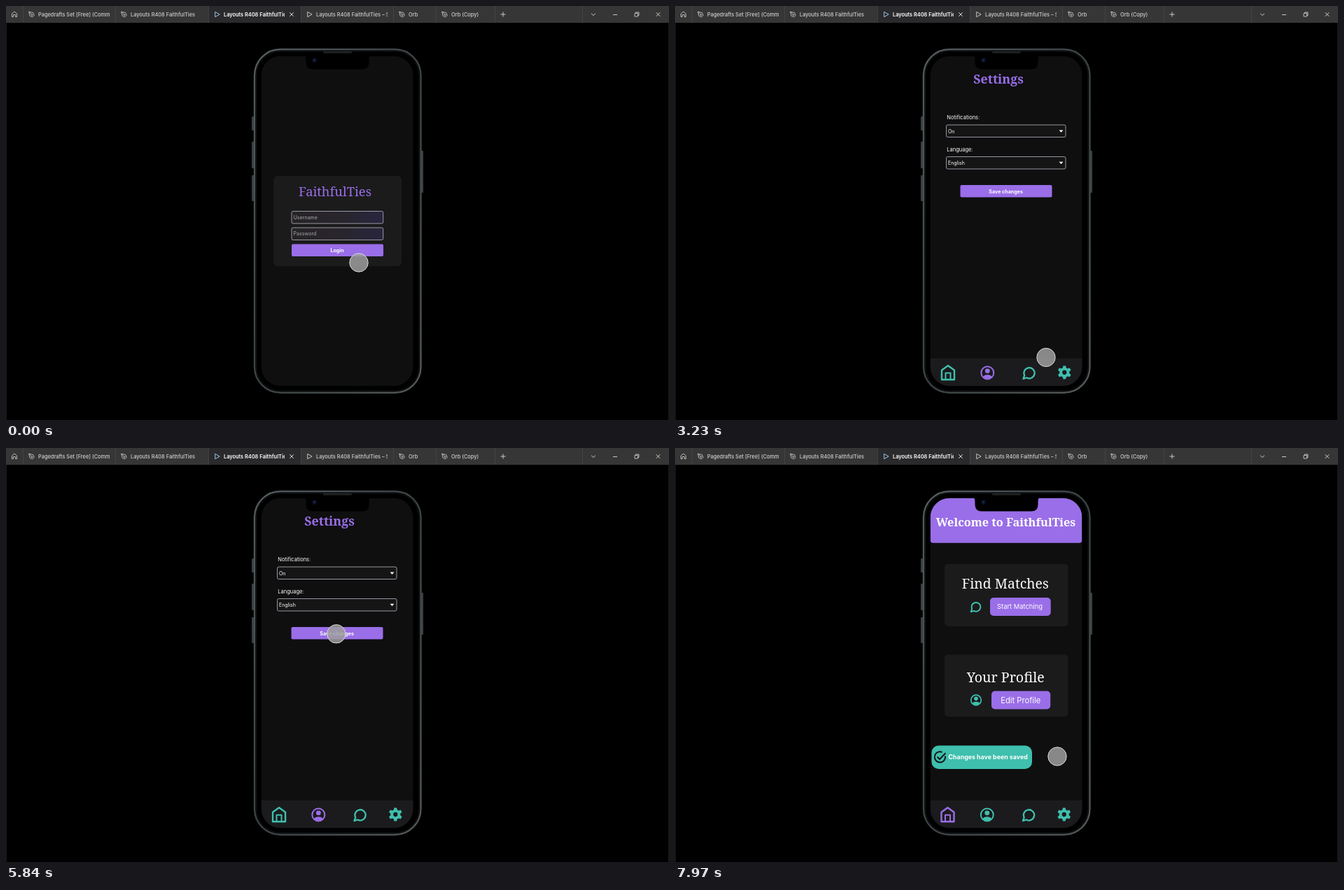
Animation, 947 px wide and 592 px high, one loop 8 s. Source, as an HTML page:

```html
<!DOCTYPE html>
<html lang="en">
<head>
<meta charset="utf-8">
<title>Phone prototype</title>
<style>
  html, body { margin: 0; width: 100%; height: 100%; overflow: hidden; background: #000; }
  #stage { display: block; width: 947px; height: 592px; }
  text { font-family: Inter, sans-serif; fill: #fff; }
  .serif { font-family: "Noto Serif", serif; }
  .mid { text-anchor: middle; }
  .bold { font-weight: 700; }
  .purple { fill: #9a6ee8; }
  .card { fill: #1b1b1c; }
  .field { stroke: #a5a8b0; stroke-width: .9; }
  .line { fill: none; stroke: currentColor; }
</style>
</head>
<body>
<svg id="stage" viewBox="0 0 947 592">
  <defs>
    <linearGradient id="rim" x1="0" y1="0" x2="1" y2="1">
      <stop offset="0" stop-color="#545c5e"/>
      <stop offset=".5" stop-color="#3b4244"/>
      <stop offset="1" stop-color="#545858"/>
    </linearGradient>
    <linearGradient id="input">
      <stop offset="0" stop-color="#272427"/>
      <stop offset=".55" stop-color="#29252c"/>
      <stop offset="1" stop-color="#28253f"/>
    </linearGradient>
    <clipPath id="glass"><rect x="364.800" y="71.800" width="216.600" height="471.400" rx="27"/></clipPath>

    <g id="home" class="line" stroke-width="2.4" stroke-linejoin="round">
      <path d="M-9 -3.5 0 -10 9 -3.5V10H-9Z"/>
      <path d="M-3.5 10V.5H3.5V10" stroke-width="2"/>
    </g>
    <g id="user" fill="currentColor">
      <circle class="line" r="8.8" stroke-width="2" fill="none"/>
      <circle cy="-2.6" r="3.4"/>
      <path d="M-6.3 5.6C-4.4 1.8 4.4 1.8 6.3 5.6 3.5 9 -3.5 9 -6.3 5.6Z"/>
    </g>
    <path id="chat" class="line" stroke-width="2.3" stroke-linejoin="round"
      d="M-8 8.6-6.3 3.7A7.6 7.6 0 1 1-3.2 7Z"/>
    <g id="gear"></g>
    <g id="nib" class="line" stroke-width=".9" stroke-linejoin="round">
      <path d="M-3.8 -3.8 2.2 -2.4 3.8 1.4 1.4 3.8 -2.4 2.2ZM-3.8 -3.8 .1 .1"/>
      <circle cx=".7" cy=".7" r=".9"/>
    </g>
    <path id="play" class="line" d="M-2.8 -3.6 3.6 0 -2.8 3.6Z" stroke-linejoin="round"/>
    <path id="cross" class="line" d="M-2.8 -2.8 2.8 2.8M2.8 -2.8 -2.8 2.8"/>
  </defs>

  <rect width="947" height="592"/>
  <path d="M.5 24V591.5M946.5 24V591.5" stroke="#1b1b18"/>
  <g id="bar"></g>

  <g fill="#3a4042">
    <rect x="351" y="158" width="4" height="20" rx="1"/>
    <rect x="351" y="194" width="4" height="38" rx="1"/>
    <rect x="351" y="242" width="4" height="37" rx="1"/>
    <rect x="592" y="207" width="4" height="60" rx="1"/>
  </g>
  <rect x="355" y="62" width="237.500" height="491" rx="37" fill="#000" stroke="url(#rim)" stroke-width="2.4"/>
  <rect x="357.500" y="64.500" width="232.500" height="486" rx="34.500" fill="none" stroke="#15191b"/>

  <g clip-path="url(#glass)">
    <rect x="364" y="71" width="218" height="473" fill="#0f0f10"/>
    <g id="login">
      <rect class="card" x="382" y="243" width="183" height="129" rx="6"/>
      <text class="serif mid purple" x="470" y="272" font-size="18.400">FaithfulTies</text>
      <g class="field" fill="url(#input)">
        <rect x="408" y="293.500" width="130.700" height="17.500" rx="2"/>
        <rect x="408" y="317" width="130.700" height="17.500" rx="2"/>
      </g>
      <g font-size="7.100">
        <text x="410.500" y="304.700" style="fill:#a9a8aa">Username</text>
        <text x="410.500" y="328.200" style="fill:#a9a8aa">Password</text>
        <rect class="purple" x="408" y="340.500" width="131" height="17.500" rx="2"/>
        <text class="mid bold" x="473" y="352">Login</text>
      </g>
    </g>
    <g id="welcome">
      <rect class="purple" x="364.800" y="62" width="216.600" height="73.700" rx="4"/>
      <text class="serif mid bold" x="472.500" y="112" font-size="16.300">Welcome to FaithfulTies</text>
      <rect class="card" x="385" y="166" width="176.500" height="89" rx="5"/>
      <text class="serif mid" x="471.700" y="201" font-size="19.400">Find Matches</text>
      <use href="#chat" transform="translate(429.500 227) scale(.84)" color="#3fbfad"/>
      <rect class="purple" x="450" y="214" width="86.700" height="26" rx="5"/>
      <text class="mid" x="492.500" y="230.300" font-size="9.400">Start Matching</text>
      <rect class="card" x="385" y="295.500" width="176.500" height="88.500" rx="5"/>
      <text class="serif mid" x="472.300" y="335" font-size="19.600">Your Profile</text>
      <use href="#user" transform="translate(430 360.500) scale(.83)" color="#3fbfad"/>
      <rect class="purple" x="452" y="347.500" width="84.200" height="26" rx="5"/>
      <text class="mid" x="493.700" y="365.300" font-size="11.200">Edit Profile</text>
    </g>
    <g id="settings">
      <text class="serif mid purple" x="462" y="111" font-size="17.800" font-weight="600">Settings</text>
      <text x="388.300" y="162.400" font-size="7.500">Notifications:</text>
      <text x="388.300" y="207.600" font-size="7.500">Language:</text>
      <g class="field" fill="#151516">
        <rect x="387.500" y="170" width="170.500" height="17.500" rx="2"/>
        <rect x="387.500" y="215.500" width="170.500" height="17.500" rx="2"/>
      </g>
      <path d="M548.500 177.500h6l-3 3.300ZM548.500 222.800h6l-3 3.300Z" fill="#fff"/>
      <text x="390" y="181.500" font-size="7">On</text>
      <text x="390" y="226.800" font-size="7">English</text>
      <rect class="purple" x="407.500" y="256" width="131" height="17.500" rx="2"/>
      <text class="mid bold" x="472.700" y="267.700" font-size="7.150">Save changes</text>
    </g>
    <g id="toast">
      <rect x="366.500" y="425.500" width="143.500" height="33.500" rx="10" fill="#3fbfad"/>
      <path d="M385.900 440.500A7.600 7.600 0 1 1 381.500 435M374.500 441.500 378 445 386.500 436.200"
        fill="none" stroke="#131b1b" stroke-width="2"/>
      <text class="bold" x="390.500" y="445.200" font-size="8.850">Changes have been saved</text>
    </g>
    <g id="nav">
      <rect x="364" y="504" width="218" height="40" fill="#1b1b1d"/>
      <g id="navIcons"></g>
    </g>
  </g>

  <path d="M427 71H520Q518.500 73 518.500 76V81Q518.500 90.500 509 90.500H438Q428.500 90.500 428.500 81V76Q428.500 73 427 71Z"/>
  <rect x="453" y="65" width="41" height="2.500" rx="1.200" fill="#202223"/>
  <circle cx="440.500" cy="77.500" r="3.600" fill="#0a0d1c"/>
  <circle cx="440.500" cy="77.500" r="1.400" fill="#1d2c60"/>

  <circle id="cursor" r="13.200" fill="#9e9e9e" fill-opacity=".85" stroke="#d8d8d8"/>
</svg>
<script>
const LOOP = 8000, LOGIN_AT = 480, SETTINGS_AT = 2850, SAVED_AT = 5850;
const TEAL = '#3fbfad', PURPLE = '#9a6ee8';
const el = id => document.getElementById(id);
const icon = (name, x, y, color, scale = 1) =>
  `<use href="#${name}" transform="translate(${x} ${y}) scale(${scale})" color="${color}"/>`;

el('gear').innerHTML = '<circle class="line" r="5.200" stroke-width="4"/>' +
  [0, 60, 120, 180, 240, 300].map(a =>
    `<path d="M-2.700 -6 -1.900 -9.800H1.900L2.700 -6Z" fill="currentColor" transform="rotate(${a})"/>`).join('');

// Window tabs: left edge, right edge, icon, label
const tabs = [
  [24, 156, 'nib', 'Pagedrafts Set [Free] (Community)'],
  [156, 289, 'nib', 'Layouts R408 FaithfulTies'],
  [289, 421, 'play', 'Layouts R408 FaithfulTies'],
  [421, 553, 'play', 'Layouts R408 FaithfulTies – Start'],
  [553, 614, 'nib', 'Orb'],
  [614, 698, 'nib', 'Orb (Copy)']
];
el('bar').innerHTML = '<rect width="947" height="24" fill="#363637"/>' +
  tabs.map(([left, right, symbol, label], i) => {
    const active = i === 2;
    const room = right - left - (active ? 45 : 30);
    return (active ? `<rect x="${left}" width="${right - left}" height="24" fill="#2a2a2c"/>` : '') +
      icon(symbol, left + 12.500, 12, active ? '#9cc4e6' : '#c2c2c2') +
      `<svg x="${left + 22}" width="${room}" height="24">
        <text y="14.500" font-size="7.400" font-weight="${active ? 600 : 500}"
          style="fill:${active ? '#fff' : '#d0d0d0'}">${label}</text></svg>`;
  }).join('') +
  `<path d="${[24, 156, 289, 421, 553, 614, 698, 823].map(x => `M${x}.500 0V24`).join('')}" stroke="#47474a" stroke-width=".8"/>` +
  icon('cross', 408, 12, '#d8d8d8') + icon('cross', 931.500, 12, '#d0d0d0') +
  `<g class="line" color="#c8c8c8">
    <path d="M8.500 11 12 8 15.500 11V15.500H13.500V12.500H10.500V15.500H8.500Z" stroke-width=".9"/>
    <path d="M706.500 12H713.500M710 8.500V15.500M836 10.700 839 13.500 842 10.700M867 12.500H873"/>
    <path d="M898 10.500H902.500V15H898ZM899.500 10.500V9H904V13.500H902.500" stroke-width=".9"/>
  </g>`;

function drawNav(onSettings) {
  const shift = onSettings ? .5 : 0;
  el('navIcons').innerHTML =
    icon('home', 389.500 + shift, 524.200, onSettings ? TEAL : PURPLE) +
    icon('user', 445.800 + shift, 524.500, onSettings ? PURPLE : TEAL, 1.020) +
    icon('chat', 505 + shift, 524.500, TEAL) +
    icon('gear', 555.800 + shift, 524, TEAL, .98);
}

// Pointer stops: time, x, y
const stops = [
  [0, 504, 367], [280, 500, 352], [520, 500, 352], [1260, 552.500, 434.500],
  [1620, 575, 549], [2100, 577, 551], [2500, 574, 546], [2750, 558, 528],
  [2900, 556, 526], [3230, 530, 502.500], [3950, 468, 245], [4500, 438, 186],
  [5100, 431.700, 203], [5600, 470, 264], [5900, 472, 266],
  [6470, 466.700, 296], [7970, 546, 441], [8000, 546, 441]
];
function pointerAt(t) {
  const i = stops.findIndex(s => s[0] > t);
  const [a, b] = [stops[i - 1], stops[i]];
  const u = (t - a[0]) / (b[0] - a[0]);
  const ease = u * u * (3 - 2 * u);
  return [1, 2].map(k => a[k] + (b[k] - a[k]) * ease);
}

const show = (id, on) => { el(id).style.display = on ? '' : 'none'; };
function frame(now) {
  const t = now % LOOP;
  const onLogin = t < LOGIN_AT;
  const onSettings = t >= SETTINGS_AT && t < SAVED_AT;
  show('login', onLogin);
  show('settings', onSettings);
  show('welcome', !onLogin && !onSettings);
  show('toast', t >= SAVED_AT);
  show('nav', !onLogin);
  drawNav(onSettings);
  el('cursor').setAttribute('transform', `translate(${pointerAt(t)})`);
}

const start = performance.now();
function tick() {
  frame(performance.now() - start);
  requestAnimationFrame(tick);
}
tick();
</script>
</body>
</html>
```
